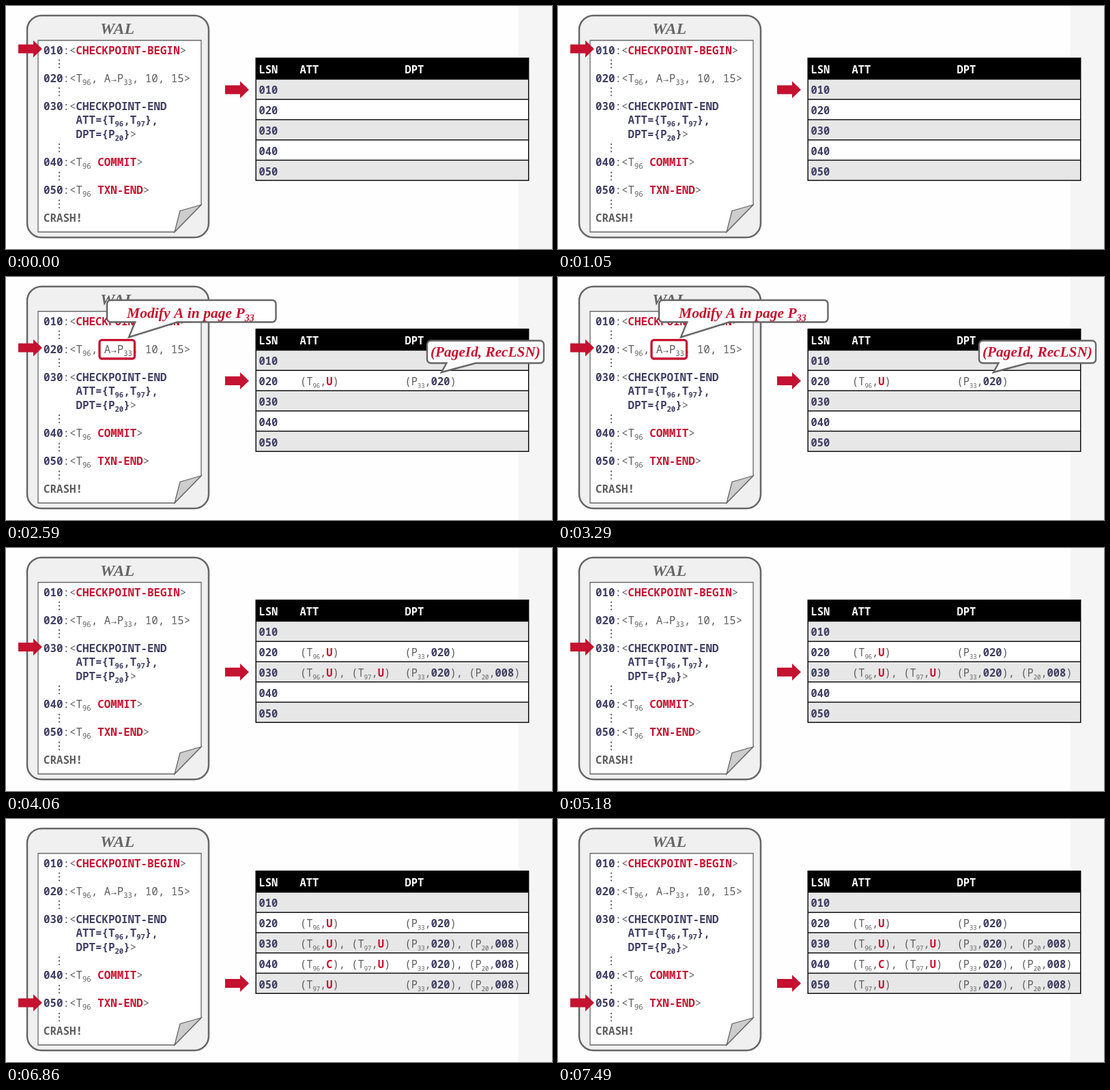
Animation, 800 px wide and 357 px high, one loop 7.98 s. Source, as an HTML page with a canvas:

```html
<!DOCTYPE html>
<html lang="en">
<head>
<meta charset="utf-8">
<title>WAL recovery</title>
<style>
html, body { margin: 0; width: 100%; height: 100%; overflow: hidden; background: #fff; }
canvas { display: block; width: 800px; height: 357px; }
</style>
</head>
<body>
<canvas id="stage"></canvas>
<script>
const LOOP = 7980;
const RED = '#c41230', NAVY = '#3f3e63', GREY = '#5e5e5e', EDGE = '#666';
const MONO = '"Noto Sans Mono", "DejaVu Sans Mono", monospace';
const SERIF = '"Liberation Serif", "Noto Serif", serif';

const canvas = document.getElementById('stage');
const ctx = canvas.getContext('2d');
const dpr = window.devicePixelRatio || 1;
canvas.width = 800 * dpr;
canvas.height = 357 * dpr;

// Style marks in a line: ~ plain, ^ navy, @ red, # bold grey, _ two-digit subscript
const STYLES = {
  '~': ['400', GREY],
  '^': ['700', NAVY],
  '@': ['700', RED],
  '#': ['700', GREY]
};

const LOG = [
  [55, 70.5, '^010~:<@CHECKPOINT-BEGIN~>'],
  [55, 111.5, '^020~:<T_96, A#→~P_33, 10, 15>'],
  [55, 153, '^030~:<^CHECKPOINT-END'],
  [102.5, 173, '^ATT={T_96,T_97},'],
  [102.5, 194, '^DPT={P_20}~>'],
  [55, 235, '^040~:<T_96 @COMMIT~>'],
  [55, 276, '^050~:<T_96 @TXN-END~>'],
  [55, 317, '#CRASH!']
];

const PAGES = '~(P_33,^020~), (P_20,^008~)';
const ROWS = [
  { at: 0, y: 63, att: '', dpt: '' },
  { at: 1400, y: 104, att: '~(T_96,@U~)', dpt: '~(P_33,^020~)', dptAt: 2590 },
  { at: 4060, y: 145.5, att: '~(T_96,@U~), (T_97,@U~)', dpt: PAGES },
  { at: 5530, y: 228.5, att: '~(T_96,@C~), (T_97,@U~)', dpt: PAGES },
  { at: 6860, y: 270, att: '~(T_97,@U~)', dpt: PAGES }
];

function rich(x, y, line, size, subSize) {
  let weight = '400';
  for (const part of line.match(/_\d\d|[~^@#]|[^_~^@#]+/g) || []) {
    if (STYLES[part]) {
      weight = STYLES[part][0];
      ctx.fillStyle = STYLES[part][1];
      continue;
    }
    const sub = part[0] === '_';
    const text = sub ? part.slice(1) : part;
    ctx.font = `${weight} ${sub ? subSize : size}px ${MONO}`;
    ctx.fillText(text, x, y + (sub ? 4 : 0));
    x += ctx.measureText(text).width;
  }
}

function polygon(points) {
  ctx.beginPath();
  points.forEach(([x, y]) => ctx.lineTo(x, y));
  ctx.closePath();
}

function roundRect(x, y, w, h, r) {
  ctx.beginPath();
  ctx.roundRect(x, y, w, h, r);
}

function paint(fill, stroke, width) {
  ctx.fillStyle = fill;
  ctx.fill();
  if (!stroke) return;
  ctx.strokeStyle = stroke;
  ctx.lineWidth = width;
  ctx.stroke();
}

function arrow(x, y) {
  polygon([[x, y - 6.5], [x + 22, y - 6.5], [x + 22, y - 12.5], [x + 35, y],
    [x + 22, y + 12.5], [x + 22, y + 6.5], [x, y + 6.5]]);
  paint(RED);
}

function serif(text, x, y, size, color) {
  ctx.font = `italic 700 ${size}px ${SERIF}`;
  ctx.fillStyle = color;
  ctx.fillText(text, x, y);
  return x + ctx.measureText(text).width;
}

function bubble(x, y, w, h, tipX, tipY) {
  const r = 5.5, right = x + w, bottom = y + h;
  ctx.beginPath();
  ctx.moveTo(x + r, y);
  ctx.arcTo(right, y, right, bottom, r);
  ctx.arcTo(right, bottom, x, bottom, r);
  ctx.lineTo(x + w * 5 / 12, bottom);
  ctx.lineTo(tipX, tipY);
  ctx.lineTo(x + w / 6, bottom);
  ctx.arcTo(x, bottom, x, y, r);
  ctx.arcTo(x, y, right, y, r);
  ctx.closePath();
  paint('#fff', EDGE, 2.4);
}

function backdrop() {
  ctx.fillStyle = '#fefefe';
  ctx.fillRect(0, 0, 800, 357);
  ctx.fillStyle = '#f5f5f5';
  ctx.fillRect(750.5, 0, 49.5, 357);
}

function logSheet() {
  roundRect(31, 14, 266, 326, 21);
  paint('#f0f0f0', EDGE, 2.5);
  serif('WAL', 138, 41, 24, EDGE);
  polygon([[47, 50.5], [286, 50.5], [286, 292], [247, 332], [47, 332]]);
  paint('#fff', EDGE, 1.3);
  polygon([[286, 292], [255, 301], [247, 332]]);
  paint('#cdcdcd', EDGE, 1.3);
  for (const [x, y, line] of LOG) rich(x, y, line, 15.85, 10.5);
  ctx.fillStyle = GREY;
  for (const y of [85, 126, 208.5, 250, 291]) {
    for (const step of [-5.3, 0, 5.3]) {
      ctx.beginPath();
      ctx.arc(78, y + step, 1.15, 0, Math.PI * 2);
      ctx.fill();
    }
  }
}

function table(t) {
  const top = 107.5, pitch = 29.75;
  ctx.fillStyle = '#000';
  ctx.fillRect(366, 76, 400, top - 76);
  ctx.font = `700 15.4px ${MONO}`;
  ctx.fillStyle = '#fff';
  ctx.fillText('LSN', 370.5, 98.5);
  ctx.fillText('ATT', 430.5, 98.5);
  ctx.fillText('DPT', 584.5, 98.5);
  ROWS.forEach((row, i) => {
    const y = top + i * pitch, base = 128.5 + i * 30;
    ctx.fillStyle = i % 2 ? '#fff' : '#e7e7e7';
    ctx.fillRect(366, y, 400, pitch);
    ctx.fillStyle = '#000';
    ctx.fillRect(366, y - 0.7, 400, 1.4);
    rich(370.5, base, `^0${i + 1}0`, 15.4, 8.9);
    if (t >= row.at) rich(431, base, row.att, 15.4, 8.9);
    if (t >= (row.dptAt || row.at)) rich(584.5, base, row.dpt, 15.4, 8.9);
  });
  ctx.strokeStyle = '#000';
  ctx.lineWidth = 1.4;
  ctx.strokeRect(366.2, 76.5, 399.5, top + 5 * pitch - 76.5);
}

function callouts(t) {
  if (t >= 1400 && t < 2590) {
    bubble(462, 93.5, 156, 33, 481, 140);
    serif('(TxnId, Status)', 473, 116.5, 21.8, RED);
  }
  if (t >= 2590 && t < 4060) {
    roundRect(137, 92.7, 51.5, 27.3, 3.5);
    ctx.strokeStyle = RED;
    ctx.lineWidth = 3.3;
    ctx.stroke();
    bubble(148, 34, 247.5, 32.3, 180, 88.5);
    const end = serif('Modify A in page P', 177, 59.5, 21.6, RED);
    serif('33', end, 65, 14, RED);
    bubble(617, 93.5, 171, 33, 638, 140);
    serif('(PageId, RecLSN)', 622, 116.5, 21.3, RED);
  }
}

function draw(t) {
  ctx.setTransform(dpr, 0, 0, dpr, 0, 0);
  backdrop();
  logSheet();
  table(t);
  const current = ROWS.filter(row => t >= row.at).length - 1;
  arrow(18, ROWS[current].y);
  arrow(321, 123 + current * 29.6);
  callouts(t);
}

const start = performance.now();
function tick() {
  draw((performance.now() - start) % LOOP);
  requestAnimationFrame(tick);
}
tick();
</script>
</body>
</html>
```
